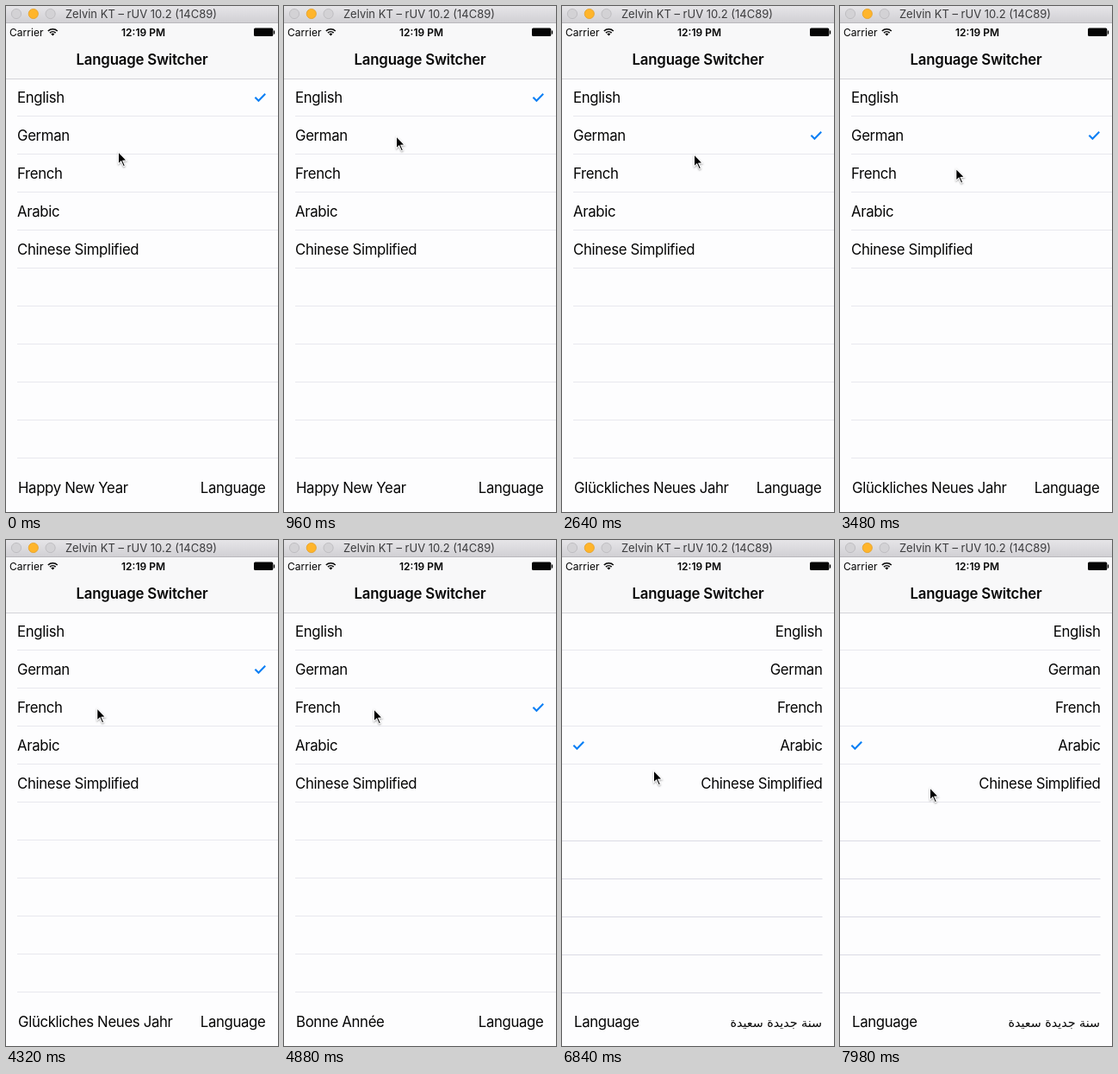
An HTML page with a canvas for the animation above (8 s loop, 316 by 586 pixels).

```html
<!DOCTYPE html>
<html lang="en">
<head>
<meta charset="utf-8">
<title>Language Switcher</title>
<style>
  html, body { margin: 0; width: 100%; height: 100%; overflow: hidden; background: #fdfdfe; }
  canvas { display: block; width: 316px; height: 586px; }
</style>
</head>
<body>
<canvas id="stage"></canvas>
<script>
const W = 316, H = 586, LOOP = 8000, ROW = 44, TOP = 84;
const canvas = document.getElementById('stage');
const ctx = canvas.getContext('2d');
const dpr = window.devicePixelRatio || 1;
canvas.width = W * dpr;
canvas.height = H * dpr;

const SANS = 'Inter, Roboto, sans-serif';
const ARABIC = '"DejaVu Sans", "Noto Sans", sans-serif';
const INK = '#050505';
const languages = ['English', 'German', 'French', 'Arabic', 'Chinese Simplified'];
const greetings = ['Happy New Year', 'Glückliches Neues Jahr', 'Bonne Année', 'سنة جديدة سعيدة'];

// Each tap highlights its row, then switches the language.
const taps = [
  { row: 1, down: 2180, up: 2300 },
  { row: 2, down: 4660, up: 4780 },
  { row: 3, down: 6540, up: 6700 }
];

// Pointer tip: time, x, y
const path = [
  [0, 130, 169], [520, 130, 166], [960, 130, 151], [1600, 134, 150],
  [2150, 149, 153], [2340, 151, 155], [2640, 153, 172], [3300, 140, 187],
  [4000, 106, 195], [4820, 104, 195], [5500, 103, 238], [5860, 103, 242],
  [6680, 103, 244], [6840, 106, 267], [7400, 105, 284], [8000, 104, 287]
];

function pointerAt(t) {
  let i = 0;
  while (i < path.length - 2 && t >= path[i + 1][0]) i++;
  const [t0, x0, y0] = path[i], [t1, x1, y1] = path[i + 1];
  const u = (t - t0) / (t1 - t0), e = u * u * (3 - 2 * u);
  return [x0 + (x1 - x0) * e, y0 + (y1 - y0) * e];
}

function text(str, x, y, { size = 16.8, weight = 400, align = 'left', color = INK, track = -0.35, family = SANS } = {}) {
  ctx.font = `${weight} ${size}px ${family}`;
  ctx.letterSpacing = track + 'px';
  ctx.textAlign = align;
  ctx.fillStyle = color;
  ctx.fillText(str, x, y);
}

function rect(x, y, w, h, fill) {
  ctx.fillStyle = fill;
  ctx.fillRect(x, y, w, h);
}

function stroke(points, color, width) {
  ctx.beginPath();
  points.forEach(([x, y]) => ctx.lineTo(x, y));
  ctx.strokeStyle = color;
  ctx.lineWidth = width;
  ctx.stroke();
}

function windowBar() {
  const shade = ctx.createLinearGradient(0, 0, 0, 20);
  shade.addColorStop(0, '#e6e5e8');
  shade.addColorStop(1, '#d0cfd3');
  rect(0, 0, W, 20, shade);
  rect(0, 19, W, 1, '#b9b8bc');
  const idle = ['#d3d2d5', '#b9b8bb'];
  [idle, ['#ffb52b', '#e59f24'], idle].forEach(([fill, edge], i) => {
    ctx.beginPath();
    ctx.arc(12 + 19.8 * i, 9, 5.6, 0, Math.PI * 2);
    ctx.fillStyle = fill;
    ctx.fill();
    ctx.strokeStyle = edge;
    ctx.lineWidth = 0.8;
    ctx.stroke();
  });
  text('Zelvin KT – rUV 10.2 (14C89)', 157, 14, { size: 13, align: 'center', color: '#3b3b3d', track: 0 });
}

function wifi(x, y) {
  ctx.strokeStyle = INK;
  ctx.lineWidth = 1.6;
  for (const r of [4.7, 7.7]) {
    ctx.beginPath();
    ctx.arc(x, y, r, -Math.PI * 0.75, -Math.PI * 0.25);
    ctx.stroke();
  }
  ctx.beginPath();
  ctx.moveTo(x, y);
  ctx.arc(x, y, 2.8, -Math.PI * 0.75, -Math.PI * 0.25);
  ctx.fillStyle = INK;
  ctx.fill();
}

function battery() {
  ctx.beginPath();
  ctx.roundRect(288, 25.5, 22.3, 9.5, 1.6);
  ctx.fillStyle = INK;
  ctx.fill();
  rect(310.8, 28.5, 1.4, 4, INK);
}

function header() {
  rect(0, 20, W, 64, '#f8f8f9');
  rect(0, 84, W, 1, '#d3d3d8');
  text('Carrier', 4, 34.5, { size: 12, track: 0.05 });
  wifi(54.3, 34.5);
  text('12:19 PM', 159.5, 34.5, { size: 12, weight: 600, align: 'center', track: 0 });
  battery();
  text('Language Switcher', 158, 68, { weight: 600, align: 'center', track: -0.2 });
}

function list(current, pressed, rtl) {
  const x = rtl ? 302.5 : 13, align = rtl ? 'right' : 'left';
  if (pressed >= 0) rect(0, TOP + ROW * pressed, W, ROW, '#d9d9d9');
  for (let i = 0; i < 10; i++) {
    const shifted = rtl && i > 4;
    rect(rtl ? 0 : 13, 127 + ROW * i + (shifted ? 1 : 0), rtl ? 302.5 : 303, 1, shifted ? '#dadae4' : '#e8e8ee');
  }
  languages.forEach((name, i) => text(name, x, 111.5 + ROW * i, { align }));
  const cx = rtl ? 13 : 289, cy = 106 + ROW * current;
  stroke([[cx + 0.4, cy - 0.2], [cx + 4.4, cy + 3.8], [cx + 12.2, cy - 4.2]], '#0a7ff5', 2.1);
}

function footer(current, rtl) {
  if (rtl) {
    text('Language', 14, 563.5);
    ctx.direction = 'rtl';
    text(greetings[current], 302, 563.5, { size: 14.3, align: 'right', track: 0, family: ARABIC });
    ctx.direction = 'ltr';
  } else {
    text(greetings[current], 14, 563.5);
    text('Language', 301.5, 563.5, { align: 'right' });
  }
}

function pointer(x, y) {
  ctx.save();
  ctx.translate(x, y);
  ctx.shadowColor = 'rgba(0,0,0,0.35)';
  ctx.shadowBlur = 2 * dpr;
  ctx.shadowOffsetY = dpr;
  ctx.beginPath();
  [[0, -1], [0, 15], [3.6, 11.7], [6.2, 17.5], [9, 16.3], [6.5, 10.7], [11.4, 10.5]].forEach(([px, py]) => ctx.lineTo(px, py));
  ctx.closePath();
  ctx.fillStyle = '#fff';
  ctx.fill();
  ctx.shadowColor = 'transparent';
  ctx.beginPath();
  [[1, 1.3], [1, 12.7], [3.9, 10], [6.7, 16.2], [7.7, 15.7], [5, 9.7], [9, 9.5]].forEach(([px, py]) => ctx.lineTo(px, py));
  ctx.closePath();
  ctx.fillStyle = '#000';
  ctx.fill();
  ctx.restore();
}

function draw(t) {
  const done = taps.filter(tap => t >= tap.up);
  const current = done.length ? done[done.length - 1].row : 0;
  const held = taps.find(tap => t >= tap.down && t < tap.up);
  const rtl = current === 3;
  ctx.setTransform(dpr, 0, 0, dpr, 0, 0);
  rect(0, 0, W, H, '#fdfdfe');
  list(current, held ? held.row : -1, rtl);
  header();
  windowBar();
  footer(current, rtl);
  pointer(...pointerAt(t));
}

const start = performance.now();
function tick() {
  draw((performance.now() - start) % LOOP);
  requestAnimationFrame(tick);
}
tick();
</script>
</body>
</html>
```
